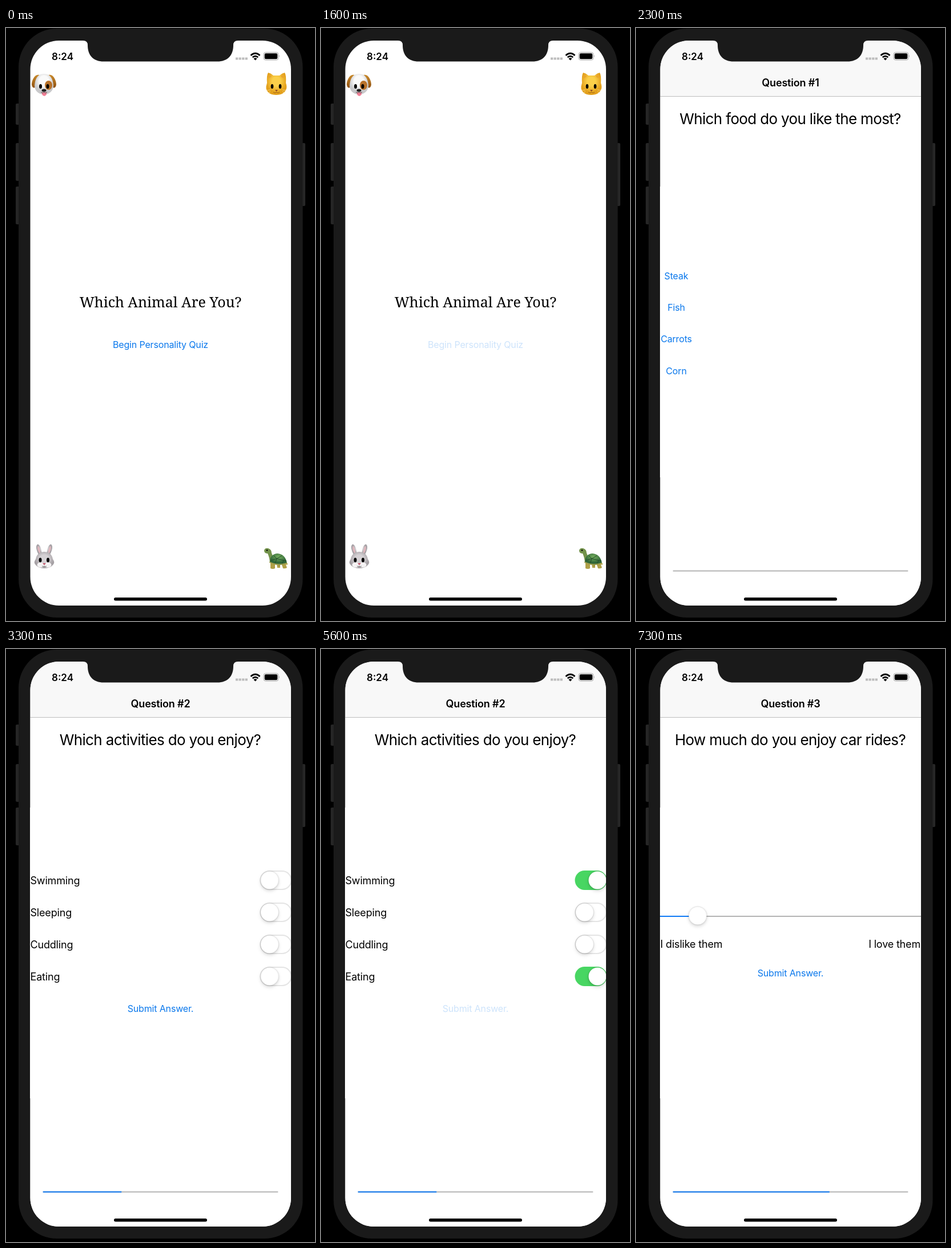
Write an HTML page that moves like this. It is 541 px wide and 1036 px high and loops after 8000 ms.

```html
<!DOCTYPE html>
<html lang="en">
<head>
<meta charset="utf-8">
<title>Personality quiz</title>
<style>
html, body { margin: 0; width: 100%; height: 100%; overflow: hidden; background: #000; }
svg { display: block; width: 541px; height: 1036px; }

text { font: 18px Inter, "Open Sans", sans-serif; font-optical-sizing: none; letter-spacing: -.01em; }
.mid { text-anchor: middle; }
.end { text-anchor: end; }
.title { font: 25px "Noto Serif", serif; letter-spacing: 0; }
.nav { font-weight: 600; }
.ask { font-size: 26px; letter-spacing: -.025em; }
.link { font-size: 16px; fill: #0a78ec; }
.clock { font-size: 17px; font-weight: 600; letter-spacing: 0; }
.blue { fill: #0f7af5; }
.grey { fill: #b4b4b4; }
.ring { fill: #e4e4e4; }
.knob { fill: #fff; filter: drop-shadow(0 3px 3px #0002) drop-shadow(0 0 1px #0004); }

/* 1% of the loop is 80 ms */
.modal, .track, .bar, .knob.on, .ring.on, .inner.on, .thumb, .level { animation: 8s linear infinite; }
.begin, .corn, .submit, .q1, .q2, .q3 { animation: 8s step-end infinite; }

.begin { animation-name: begin; }
.corn { animation-name: corn; }
.submit { animation-name: submit; }
@keyframes begin { 0% { opacity: 1 } 18.75%, 100% { opacity: .2 } }
@keyframes corn { 0% { opacity: 1 } 36.25%, 100% { opacity: .2 } }
@keyframes submit { 0% { opacity: 1 } 70%, 100% { opacity: .2 } }

.q1 { animation-name: q1; }
.q2 { animation-name: q2; }
.q3 { animation-name: q3; }
@keyframes q1 { 0% { visibility: visible } 37.5%, 100% { visibility: hidden } }
@keyframes q2 { 0% { visibility: hidden } 37.5% { visibility: visible } 71.25%, 100% { visibility: hidden } }
@keyframes q3 { 0% { visibility: hidden } 71.25%, 100% { visibility: visible } }

/* critically damped slide */
.modal { animation-name: rise; }
@keyframes rise {
  0%, 20.25% { transform: translateY(988px) }
  21.25% { transform: translateY(563px) }
  22.5% { transform: translateY(159px) }
  23.75% { transform: translateY(36px) }
  25% { transform: translateY(7.6px) }
  26.25% { transform: translateY(1.5px) }
  28.75%, 100% { transform: none }
}

.track { animation-name: grow; }
@keyframes grow {
  0%, 20.5% { x: 122px; width: 0; animation-timing-function: ease-in-out }
  27.5%, 100% { x: 64.5px; width: 412px }
}
.bar { animation-name: fill; }
@keyframes fill {
  0%, 37.5% { width: 0; animation-timing-function: ease-in-out }
  41.25%, 71.25% { width: 138px; animation-timing-function: ease-in-out }
  76.25%, 100% { width: 274.5px }
}

.inner { transform-box: fill-box; transform-origin: center; }
.ring.on { animation-name: tint; }
.inner.on { animation-name: shrink; }
.knob.on { animation-name: flip; }
.late .on { animation-delay: .7s; }
@keyframes tint {
  0%, 48.75% { fill: #e4e4e4; animation-timing-function: ease }
  52%, 100% { fill: #48d662 }
}
@keyframes shrink {
  0%, 48.75% { transform: none; animation-timing-function: ease }
  55.5%, 100% { transform: scale(0) }
}
@keyframes flip {
  0%, 48.75% { transform: none; animation-timing-function: ease }
  55.5%, 100% { transform: translateX(22.5px) }
}

.thumb { animation-name: drag; }
.level { animation-name: level; }
@keyframes drag {
  0%, 83.75% { transform: none; animation-timing-function: ease-in-out }
  91.25%, 100% { transform: translateX(-162.5px) }
}
@keyframes level {
  0%, 83.75% { width: 228.5px; animation-timing-function: ease-in-out }
  91.25%, 100% { width: 66px }
}
</style>
</head>
<body>
<svg viewBox="0 0 541 1036">
  <defs>
    <clipPath id="screen"><rect x="42.5" y="22" width="456.5" height="987" rx="50"/></clipPath>
    <radialGradient id="white" cy=".35"><stop offset=".5" stop-color="#fafafa"/><stop offset="1" stop-color="#c9c9cb"/></radialGradient>
    <radialGradient id="gold" cy=".4"><stop offset=".4" stop-color="#fbd04a"/><stop offset="1" stop-color="#e3a01c"/></radialGradient>
    <radialGradient id="fur" cy=".4"><stop offset=".4" stop-color="#d6d2d5"/><stop offset="1" stop-color="#a5a0a4"/></radialGradient>
    <radialGradient id="shell" cy=".3"><stop offset=".1" stop-color="#6fa85a"/><stop offset="1" stop-color="#2f6638"/></radialGradient>
    <linearGradient id="ear" x2="0" y2="1"><stop stop-color="#c98a2c"/><stop offset="1" stop-color="#915312"/></linearGradient>
  </defs>

  <rect width="541" height="1036"/>
  <g fill="#262626">
    <rect x="17" y="132" width="8" height="37" rx="2"/>
    <rect x="17" y="201" width="8" height="66" rx="2"/>
    <rect x="17" y="277" width="8" height="66" rx="2"/>
    <rect x="516" y="201" width="8" height="110" rx="2"/>
  </g>
  <rect x="22" y="1" width="497.5" height="1029" rx="67" fill="#1a1a1a"/>

  <g clip-path="url(#screen)">
    <rect x="42" y="22" width="458" height="988" fill="#fff"/>

    <!-- home -->
    <g id="dog">
      <path d="M58 82C50 80 45 92 45 99q1 7 6 5q6-4 7-22zM75 82c8-2 13 10 13 17q-1 7-6 5q-6-4-7-22z" fill="url(#ear)"/>
      <path d="M66.500 80C55 80 51 89 50 100c0 10 7 16 16.500 16S83 110 83 100C82 89 78 80 66.500 80z" fill="url(#white)"/>
      <ellipse cx="74.500" cy="100" rx="6.500" ry="8" fill="#b8722a"/>
      <path d="M63 112h8v4q-4 6-8 0z" fill="#f07f96"/>
      <ellipse cx="60.500" cy="102" rx="2.500" ry="4"/><ellipse cx="73" cy="102" rx="2.500" ry="4"/>
      <ellipse cx="66.500" cy="109" rx="4" ry="2.500" fill="#222"/>
      <path d="M61 112q3 3 5.500 0q3 3 5.500 0" fill="none" stroke="#555"/>
    </g>
    <g id="cat">
      <path d="M457 96q-1-13 2-18q5 1 9 5h11q4-4 9-5q3 5 2 18q2 6 1 10q-4 11-18 11t-17.500-11q-.5-4 1.500-10z" fill="url(#gold)"/>
      <path d="M460 88q-1-5 0-7q3 1 5 4zM486 88q1-5 0-7q-3 1-5 4z" fill="#e9a52b"/>
      <ellipse cx="466" cy="102" rx="2.300" ry="4"/><ellipse cx="480" cy="102" rx="2.300" ry="4"/>
      <path d="M471 108h5l-2.500 3z" fill="#8f4a26"/>
      <path d="M468 112q3 3 5.500 0q3 3 5.500 0" fill="none" stroke="#9b6216"/>
      <path d="M463 108l-6 1M463 111l-5 3M484 108l6 1M484 111l5 3" stroke="#f9e6a0" stroke-width=".7"/>
    </g>
    <g id="rabbit">
      <path d="M57 920q-7-14-2-18q6 0 8 17zM77 920q7-14 2-18q-6 0-8 17z" fill="url(#fur)"/>
      <path d="M58 917q-4-9-2-12q3 2 4 12zM76 917q4-9 2-12q-3 2-4 12z" fill="#e2b6bd"/>
      <path d="M67 915q-13 1-15 13q-4 5-1 9q5 7 16 7t16-7q3-4-1-9q-2-12-15-13z" fill="url(#fur)"/>
      <ellipse cx="61" cy="938" rx="6.500" ry="4.500" fill="#f5f3f4"/><ellipse cx="73" cy="938" rx="6.500" ry="4.500" fill="#f5f3f4"/>
      <ellipse cx="60" cy="929.500" rx="2.500" ry="4"/><ellipse cx="73.500" cy="929.500" rx="2.500" ry="4"/>
      <path d="M64 935h6l-3 3.500z" fill="#c2576c"/>
      <path d="M63 940q2 2 4 0q2 2 4 0" fill="none" stroke="#777"/>
    </g>
    <g id="turtle">
      <path d="M452 913q1-5 7-4q6 2 6 8l4 11l-7 5q-1-9-4-15q-6 0-6-5z" fill="#73934b"/>
      <path d="M463 932l8 4v8q-4 2-8 0zM482 935h7l3 8q-4 2-7 1zM474 936h6v7h-5zM489 932l5 5l-5 1z" fill="#b0a047"/>
      <path d="M462 934q0-15 13-16q14 1 17 17q-13 7-30-1z" fill="url(#shell)"/>
      <path d="M469 922l5 5l9-5M474 927l-3 9M464 930l10-3l12 3l-3 7M486 930l5 1" fill="none" stroke="#254e2c" stroke-width="1"/>
      <path d="M461 933q14 7 31 2" fill="none" stroke="#a8a34e" stroke-width="1.500"/>
      <circle cx="457" cy="912.500" r="1.300"/>
    </g>
    <text class="title mid" x="270.500" y="488">Which Animal Are You?</text>
    <text class="link mid begin" x="270.500" y="558.500">Begin Personality Quiz</text>

    <!-- quiz -->
    <g class="modal">
      <rect x="42" y="22" width="458" height="988" fill="#fff"/>
      <rect x="42" y="22" width="458" height="98" fill="#f8f8f8"/>
      <rect x="42" y="119" width="458" height="1" fill="#bebebe"/>

      <g class="q1">
        <text class="nav mid" x="270.500" y="101.500">Question #1</text>
        <text class="ask mid" x="270" y="167.500">Which food do you like the most?</text>
        <text class="link mid" x="70.500" y="439">Steak</text>
        <text class="link mid" x="70.500" y="494">Fish</text>
        <text class="link mid" x="70.500" y="549">Carrots</text>
        <text class="link mid corn" x="70.500" y="604.500">Corn</text>
      </g>

      <g class="q2">
        <text class="nav mid" x="270.500" y="101.500">Question #2</text>
        <text class="ask mid" x="270" y="167.500">Which activities do you enjoy?</text>
        <text x="42.500" y="410.500">Swimming</text>
        <text x="42.500" y="466.500">Sleeping</text>
        <text x="42.500" y="522.500">Cuddling</text>
        <text x="42.500" y="578.500">Eating</text>
        <g transform="translate(444.500 387)">
          <rect class="ring on" width="56" height="34" rx="17"/>
          <rect class="inner on" x="2" y="2" width="52" height="30" rx="15" fill="#fff"/>
          <circle class="knob on" cx="17" cy="17" r="15.500"/>
        </g>
        <g transform="translate(444.500 443)">
          <rect class="ring" width="56" height="34" rx="17"/>
          <rect x="2" y="2" width="52" height="30" rx="15" fill="#fff"/>
          <circle class="knob" cx="17" cy="17" r="15.500"/>
        </g>
        <g transform="translate(444.500 499)">
          <rect class="ring" width="56" height="34" rx="17"/>
          <rect x="2" y="2" width="52" height="30" rx="15" fill="#fff"/>
          <circle class="knob" cx="17" cy="17" r="15.500"/>
        </g>
        <g class="late" transform="translate(444.500 555)">
          <rect class="ring on" width="56" height="34" rx="17"/>
          <rect class="inner on" x="2" y="2" width="52" height="30" rx="15" fill="#fff"/>
          <circle class="knob on" cx="17" cy="17" r="15.500"/>
        </g>
        <text class="link mid submit" x="270.500" y="634">Submit Answer.</text>
      </g>

      <g class="q3">
        <text class="nav mid" x="270.500" y="101.500">Question #3</text>
        <text class="ask mid" x="270" y="167.500">How much do you enjoy car rides?</text>
        <rect class="grey" x="42" y="466" width="458" height="2"/>
        <rect class="blue level" x="42" y="466" width="228.500" height="2"/>
        <circle class="knob thumb" cx="270.500" cy="466" r="15.500"/>
        <text x="42.500" y="522">I dislike them</text>
        <text class="end" x="498" y="522">I love them</text>
        <text class="link mid" x="270.500" y="572">Submit Answer.</text>
      </g>

      <rect class="grey track" x="64.500" y="947.500" width="412" height="2" rx="1"/>
      <rect class="blue bar" x="64.500" y="947.500" width="0" height="2" rx="1"/>
    </g>

    <!-- status bar -->
    <text class="clock mid" x="99" y="55.500">8:24</text>
    <path d="M402 53.500h21" stroke="#bdbdbd" stroke-width="4" stroke-dasharray="4.300 1.250"/>
    <path d="M428.500 48Q436.500 40.500 444.500 48M431.700 51.300q4.800-4.300 9.600 0" fill="none" stroke="#000" stroke-width="2.700"/>
    <path d="M433.500 53.500q3-2.500 6 0l-3 3z"/>
    <rect x="451" y="42.500" width="26" height="13.500" rx="3.800" fill="none" stroke="#a5a5a5"/>
    <rect x="452.700" y="44.200" width="22.600" height="10.100" rx="2.300"/>
    <path d="M478.300 47.200q1.700 2 0 4z" fill="#999"/>
    <rect x="189" y="995" width="163" height="5.500" rx="2.750"/>
  </g>
  <path d="M135 20H406V22Q398 22 398 30C398 48 388 58.500 370 58.500H171C153 58.500 143 48 143 30Q143 22 135 22z" fill="#1a1a1a"/>
</svg>
</body>
</html>
```
